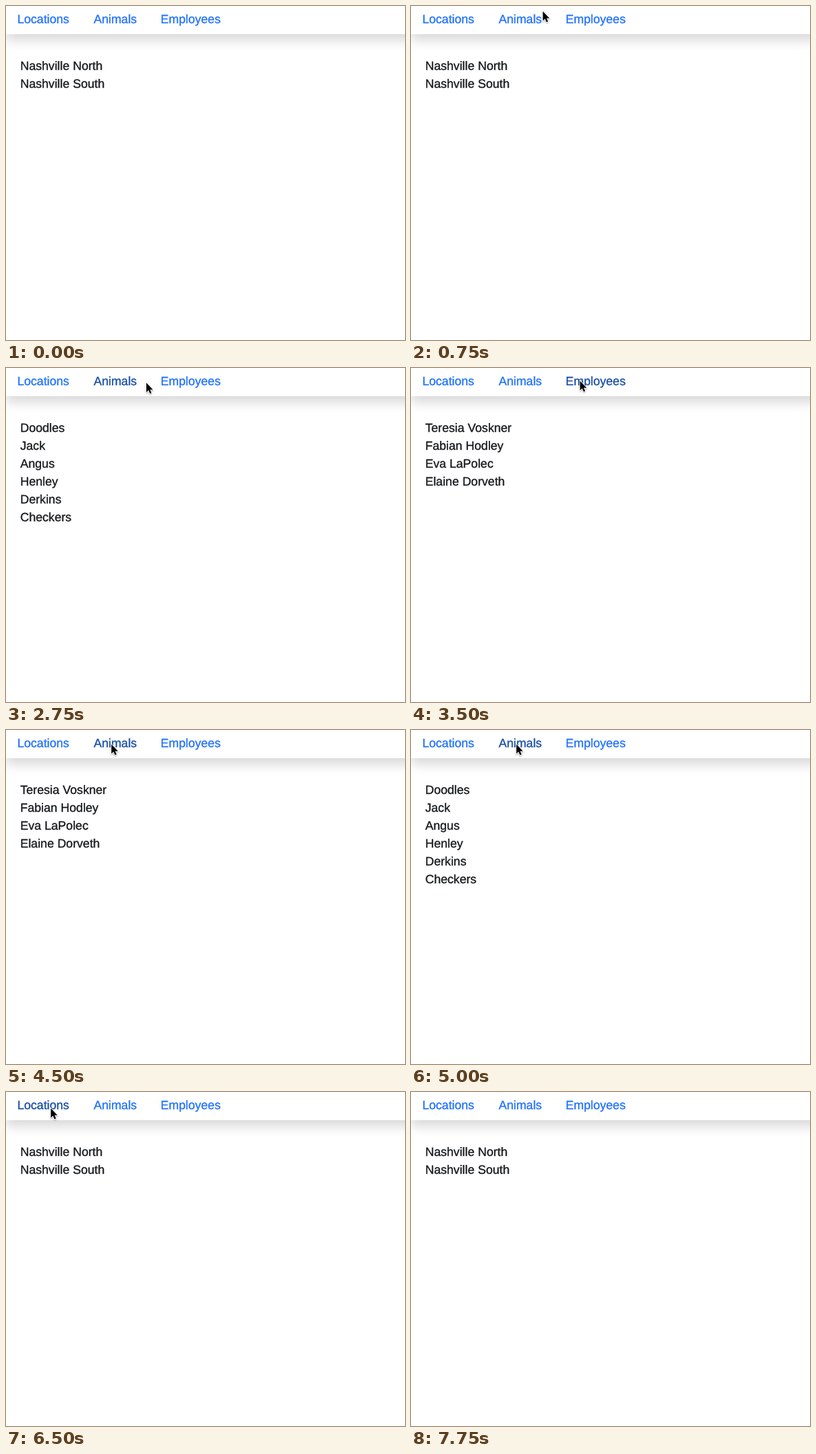
Recreate the animation shown at these times as an HTML page. Size 580x486 px, loop 9750 ms.

```html
<!DOCTYPE html>
<html lang="en">
<head>
<meta charset="utf-8">
<title>Kennel navigation</title>
<style>
  html, body { margin: 0; width: 100%; height: 100%; overflow: hidden; background: #fff; }
  #stage { position: relative; width: 580px; height: 486px; overflow: hidden; }
  /* The bar runs on past the right edge, so only its left end fades. */
  #bar {
    position: absolute; left: 0; top: 0; width: 700px; height: 41px; background: #fff;
    box-shadow: 0 8.67px 17.33px rgba(0, 0, 0, .16);
  }
  svg { position: absolute; left: 0; top: 0; }
  text {
    font: 17.65px "Liberation Sans", Arial, sans-serif;
    text-rendering: geometricPrecision;
    color: #16191c; fill: currentColor; stroke: currentColor; stroke-width: .35px;
  }
  .link { color: #2273fb; }
  .link.hover { color: #1a4fa5; }
  #cursor { filter: drop-shadow(0 1px .8px rgba(0, 0, 0, .35)); }
</style>
</head>
<body>
<div id="stage">
  <div id="bar"></div>
  <svg width="580" height="486" viewBox="0 0 580 486">
    <text class="link" x="16.4" y="25">Locations</text>
    <text class="link" x="127.4" y="25">Animals</text>
    <text class="link" x="224.7" y="25">Employees</text>
    <g id="list"></g>
    <g id="cursor">
      <path d="M1.7 .8V14.4L4.8 11.5L7 16.5L9.2 15.6L7.1 10.7H11.2Z"
            fill="#000" stroke="#fff" stroke-width="1.6" paint-order="stroke"/>
    </g>
  </svg>
</div>
<script>
const LOOP = 9750, STEP = 250, ROW = 26;
const SHOW = 250, HIDE = 7750;
const FIRST_CLICK = 2000, CLICK_GAP = 1500;

// One page per link, in the same order.
const pages = [
  ["Nashville North", "Nashville South"],
  ["Doodles", "Jack", "Angus", "Henley", "Derkins", "Checkers"],
  ["Teresia Voskner", "Fabian Hodley", "Eva LaPolec", "Elaine Dorveth"]
];

// The cursor comes in, then visits and clicks one link after another.
const entry = { x: 468, y: 98.5 };
const approach = { start: 160, x: 190, y: 7, dip: 6 };
const visits = [
  { link: 1, start: 750, hover: 1500, x: 144.5, y: 20, dip: 6 },
  { link: 2, start: 2500, hover: 3000, x: 244, y: 18, dip: 2 },
  { link: 1, start: 3750, hover: 4000, x: 151.5, y: 20, dip: 8 },
  { link: 0, start: 5390, hover: 5750, x: 63.5, y: 23, dip: 6 }
];
const stops = [entry, approach, ...visits];

const list = document.getElementById("list");
const cursor = document.getElementById("cursor");
const links = document.querySelectorAll(".link");

const groups = pages.map(rows => {
  const group = document.createElementNS(list.namespaceURI, "g");
  rows.forEach((row, i) => {
    const text = document.createElementNS(list.namespaceURI, "text");
    text.setAttribute("x", 20.7);
    text.setAttribute("y", 93 + i * ROW);
    text.textContent = row;
    group.append(text);
  });
  list.append(group);
  return group;
});

// The distance left to a stop dies away like a bell curve; the path sags midway.
function cursorAt(t) {
  const i = stops.findLastIndex(stop => stop.start <= t);
  const from = stops[i - 1], to = stops[i];
  const left = Math.exp(-.87 * ((t - to.start) / STEP) ** 2);
  return {
    x: to.x + (from.x - to.x) * left,
    y: to.y + (from.y - to.y) * left + to.dip * 4 * left * (1 - left)
  };
}

function hoverAt(t) {
  return t < HIDE ? visits.findLast(visit => visit.hover <= t)?.link : undefined;
}

function pageAt(t) {
  const clicks = Math.floor((t - FIRST_CLICK) / CLICK_GAP) + 1;
  return clicks > 0 ? visits[Math.min(clicks, visits.length) - 1].link : 0;
}

function draw(t) {
  const visible = t >= SHOW && t < HIDE;
  cursor.style.display = visible ? "" : "none";
  if (visible) {
    const { x, y } = cursorAt(t);
    cursor.setAttribute("transform", `translate(${x} ${y})`);
  }
  const hover = hoverAt(t), page = pageAt(t);
  links.forEach((link, i) => link.classList.toggle("hover", i === hover));
  groups.forEach((group, i) => { group.style.display = i === page ? "" : "none"; });
}

const start = performance.now();
function tick() {
  const t = (performance.now() - start) % LOOP;
  draw(Math.floor(t / STEP) * STEP);
  requestAnimationFrame(tick);
}
tick();
</script>
</body>
</html>
```
